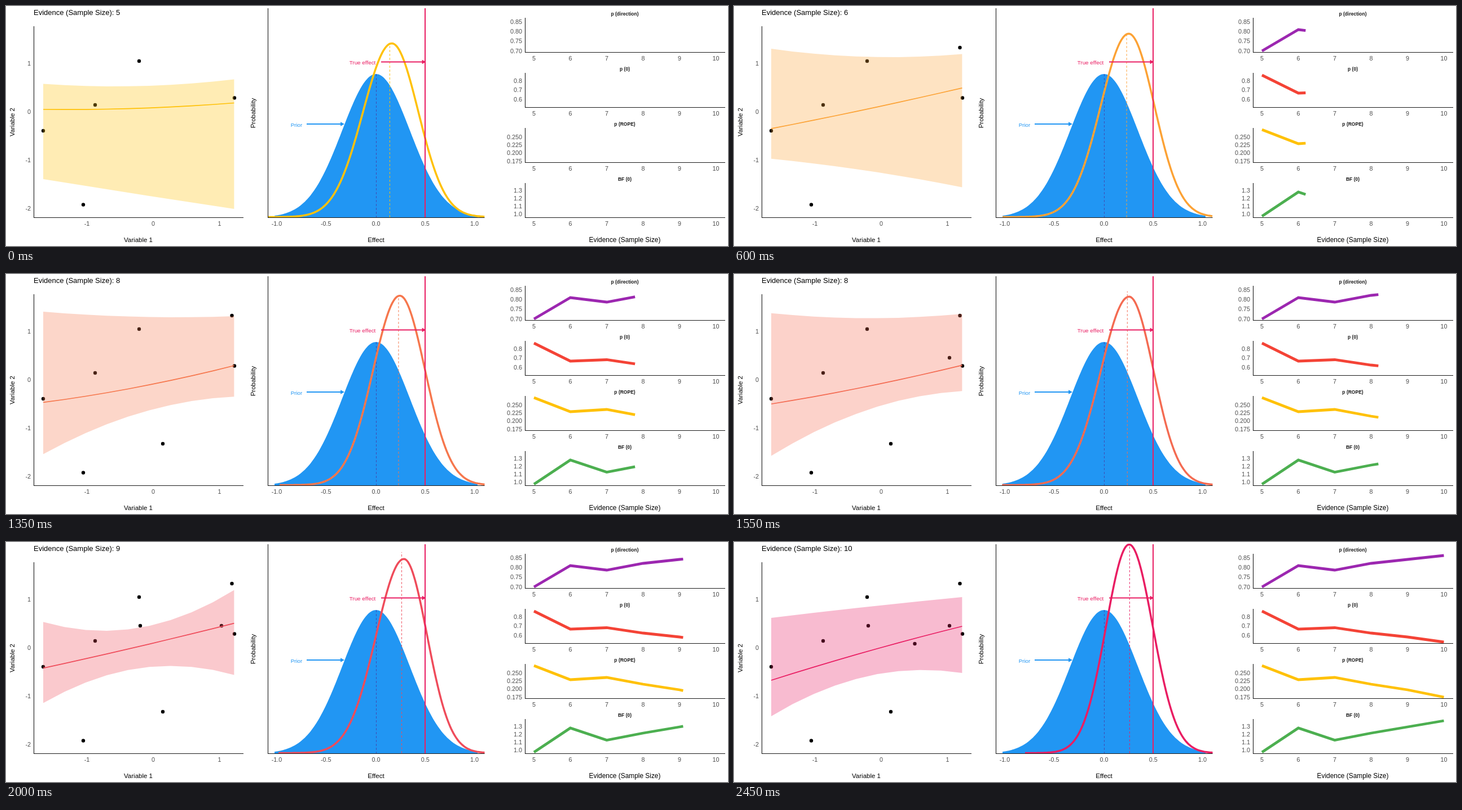
These frames come from a looping animation (1280x427 px, 2.5 s). An HTML page with a canvas:

```html
<!DOCTYPE html>
<html lang="en">
<head>
<meta charset="utf-8">
<title>Evidence and sample size</title>
<style>
html, body { margin: 0; width: 100%; height: 100%; overflow: hidden; background: #fff; }
canvas { display: block; }
</style>
</head>
<body>
<canvas id="stage" width="1280" height="427"></canvas>
<script>
const ctx = document.getElementById('stage').getContext('2d');
const FRAMES = 50, STEP = 50;
const FONT = '"Liberation Sans", Arial, sans-serif';
const PINK = '#E91E63', BLUE = '#2196F3', GREY = '#4D4D4D', INK = '#1a1a1a';

// One state per sample size, 5 to 10.
// high, mid, low: band heights at the left, middle and right
// peak: mode x, height, left spread, right spread, sag on the way to the next state
const states = [
  { high: [138.5, 142.5, 130.5], mid: [184, 182, 172.5], low: [308, 335, 361], peak: [684, 309, 51, 47, 0] },
  { high: [64.5, 79, 81.5], mid: [220, 182, 145], low: [271, 303.5, 333.5], peak: [701, 328, 50, 45, 0] },
  { high: [122, 136, 101], mid: [210.5, 190, 149], low: [275, 251, 278.5], peak: [695, 319, 48.5, 48, 0] },
  { high: [51.3, 59, 67.6], mid: [233.6, 204, 167], low: [333.5, 247, 201], peak: [699, 342, 47, 44, 15] },
  { high: [143, 157, 84], mid: [222, 185, 144], low: [284, 223, 237], peak: [706, 356, 46, 41, 34] },
  { high: [135, 115.5, 98], mid: [246, 195, 150], low: [310, 239, 233], peak: [700.5, 371, 41, 42, 0] }];

const points = [[66, 222], [137, 353.5], [158, 176], [236, 98], [405, 163.5],
  [400.5, 74], [278, 302], [382, 149], [238, 149], [320.5, 181]];

// scale: first label, step, decimals, count, first y, spacing
const panels = [
  { title: 'p (direction)', color: '#9C27B0', ys: [80, 42, 50, 38, 31, 24], scale: [0.85, 0.05, 2, 4, 28, 17.3] },
  { title: 'p (0)', color: '#F44336', ys: [123, 155, 152.5, 162, 169, 178], scale: [0.8, 0.1, 1, 3, 133, 16.5] },
  { title: 'p (ROPE)', color: '#FFC107', ys: [220, 245, 241, 253, 263, 276], scale: [0.25, 0.025, 3, 4, 233, 14.3] },
  { title: 'BF (0)', color: '#4CAF50', ys: [374, 331, 352.5, 340, 329, 318], scale: [1.3, 0.1, 1, 4, 328.5, 13.8] }];

const mix = (a, b, t) => a + (b - a) * t;
const blend = (a, b, t) => a.map((v, j) => mix(v, b[j], t));
const quad = ([a, b, c], u) => a * (1 - u) * (1 - 2 * u) + 4 * b * u * (1 - u) + c * u * (2 * u - 1);
const bell = (d, spread) => Math.exp(-((d / spread) ** 2) / 2);
const reached = k => Math.round((FRAMES - 1) * k / 5);

// State index and progress towards the next one
function locate(i) {
  let k = 0;
  while (k < 4 && i >= reached(k + 1)) k++;
  return [k, (i - reached(k)) / (reached(k + 1) - reached(k))];
}

// Amber to pink, mixed in Lab space
function shade(t, alpha = 1) {
  const L = mix(81.52, 50.86, t), a = mix(9.4, 74.65, t), b = mix(82.7, 15.4, t);
  const fy = (L + 16) / 116;
  const cube = f => f > 6 / 29 ? f ** 3 : (f - 4 / 29) * 0.12842;
  const x = 0.9505 * cube(fy + a / 500), y = cube(fy), z = 1.089 * cube(fy - b / 200);
  const rgb = [
    3.2406 * x - 1.5372 * y - 0.4986 * z,
    -0.9689 * x + 1.8758 * y + 0.0415 * z,
    0.0557 * x - 0.204 * y + 1.057 * z
  ].map(v => {
    v = Math.min(1, Math.max(0, v));
    return Math.round(255 * (v < 0.0031308 ? 12.92 * v : 1.055 * v ** (1 / 2.4) - 0.055));
  });
  return `rgba(${rgb.join(',')},${alpha})`;
}

function text(str, x, y, size, color = '#000', align = 'center', weight = '') {
  ctx.font = `${weight} ${size}px ${FONT}`;
  ctx.fillStyle = color;
  ctx.textAlign = align;
  ctx.fillText(str, x, y + size * 0.36);
}
function upright(str, x, y, size) {
  ctx.save();
  ctx.translate(x, y);
  ctx.rotate(-Math.PI / 2);
  text(str, 0, 0, size);
  ctx.restore();
}
function trace(pts) {
  ctx.beginPath();
  pts.forEach(p => ctx.lineTo(...p));
}
function line(pts, color, width, dash = []) {
  trace(pts);
  ctx.strokeStyle = color;
  ctx.lineWidth = width;
  ctx.setLineDash(dash);
  ctx.stroke();
}
function area(pts, color) {
  trace(pts);
  ctx.fillStyle = color;
  ctx.fill();
}
function curve(from, to, f) {
  const pts = [];
  for (let x = from; x <= to; x += 2) pts.push([x, f(x)]);
  return pts;
}
function axes(left, top, right, bottom) {
  line([[left, top], [left, bottom], [right, bottom]], INK, 1.1);
}
function arrow(x0, x1, y, color) {
  line([[x0, y], [x1 - 5, y]], color, 2);
  area([[x1, y], [x1 - 7, y - 3.8], [x1 - 7, y + 3.8]], color);
}

function scatter(i, [k, t], tone) {
  ctx.fillStyle = '#000';
  points.slice(0, 5 + k + (t === 1)).forEach(([x, y]) => {
    ctx.beginPath();
    ctx.arc(x, y, 3.2, 0, 7);
    ctx.fill();
  });

  const edge = name => {
    const v = blend(states[k][name], states[k + 1][name], t);
    return Array.from({ length: 10 }, (_, j) => [66 + 37.6 * j, quad(v, j / 9)]);
  };
  area([...edge('high'), ...edge('low').reverse()], shade(tone, 0.3));
  line(edge('mid'), shade(tone), 1.7);

  axes(49.5, 36, 421, 376.5);
  for (let n = 0; n < 4; n++) text(1 - n, 44, 102 + 86 * n, 10.8, GREY, 'right');
  for (let n = 0; n < 3; n++) text(n - 1, 143.5 + 117.5 * n, 387, 10.8, GREY);
  text('Variable 1', 234.5, 415.5, 11.5);
  upright('Variable 2', 11, 206.5, 11.5);
  text('Evidence (Sample Size): ' + Math.round(5 + 5 * i / (FRAMES - 1)), 49, 11.5, 13, '#000', 'left');
}

function density([k, t], tone) {
  ctx.save();
  ctx.beginPath();
  ctx.rect(464, 3, 384.5, 374);
  ctx.clip();

  const prior = curve(476, 836, x => 376 - 255 * bell(x - 656, 60));
  area([[476, 376], ...prior, [836, 376]], BLUE);
  line([[656.5, 121], [656.5, 376]], '#3F51B5', 1.1, [4, 3]);

  const [mode, height, left, right] = blend(states[k].peak, states[k + 1].peak, t);
  const mean = mode + 0.9 * (right - left);
  line([[mean, 376], [mean, 375.5 - height]], shade(tone, 0.85), 1.1, [4, 3]);

  // Halfway between two states the curve is lower and wider
  const sag = states[k].peak[4] * 4 * t * (1 - t) / height;
  const wide = left * (1 + 2.5 * sag);
  const post = x => 375.5 - height * (1 - sag) * bell(x - mode, x < mode ? wide : right);
  line(curve(mode - 4.5 * wide, 850, post), shade(tone), 3.5);
  ctx.restore();

  line([[743, 4], [743, 376]], PINK, 2);
  arrow(665, 744.5, 99.5, PINK);
  text('True effect', 632, 100.5, 9.9, PINK);
  arrow(533, 600, 210, BLUE);
  text('Prior', 515, 211.5, 9.7, BLUE);

  axes(464.5, 4, 848.5, 376.5);
  for (let v = -1; v <= 1; v += 0.5) {
    text(v.toFixed(1), (v < 0 ? 654.5 : 656) + 174.5 * v, 387, 10.8, GREY);
  }
  text('Effect', 656, 415.5, 11.7);
  upright('Probability', 438, 190.5, 11.5);
}

function indices([k, t]) {
  const col = n => 936 + 64.5 * n;
  panels.forEach(({ title, color, ys, scale }, r) => {
    const dy = 98 * r;
    const path = ys.slice(0, k + 1).map((y, n) => [col(n), y]);
    path.push([col(k + t), mix(ys[k], ys[k + 1], t)]);
    line(path, color, 4.8);

    axes(920.5, 21 + dy, 1275, 82.5 + dy);
    text(title, 1097, 14 + dy, 8.5, INK, 'center', 'bold');
    const [first, step, digits, count, y, gap] = scale;
    for (let n = 0; n < count; n++) {
      text((first - n * step).toFixed(digits), 915, y + n * gap, 10.8, GREY, 'right');
    }
    for (let n = 0; n < 6; n++) text(5 + n, col(n), 93 + dy, 10.8, GREY);
  });
  text('Evidence (Sample Size)', 1097, 415.5, 11.9);
}

function draw(now) {
  const i = Math.floor(now / STEP) % FRAMES;
  const at = locate(i);
  const tone = (at[0] + at[1]) / 5;
  ctx.fillStyle = '#fff';
  ctx.fillRect(0, 0, 1280, 427);
  scatter(i, at, tone);
  density(at, tone);
  indices(at);
}

let begin;
function tick(now) {
  begin ??= now;
  draw(now - begin);
  requestAnimationFrame(tick);
}
draw(0);
requestAnimationFrame(tick);
</script>
</body>
</html>
```
